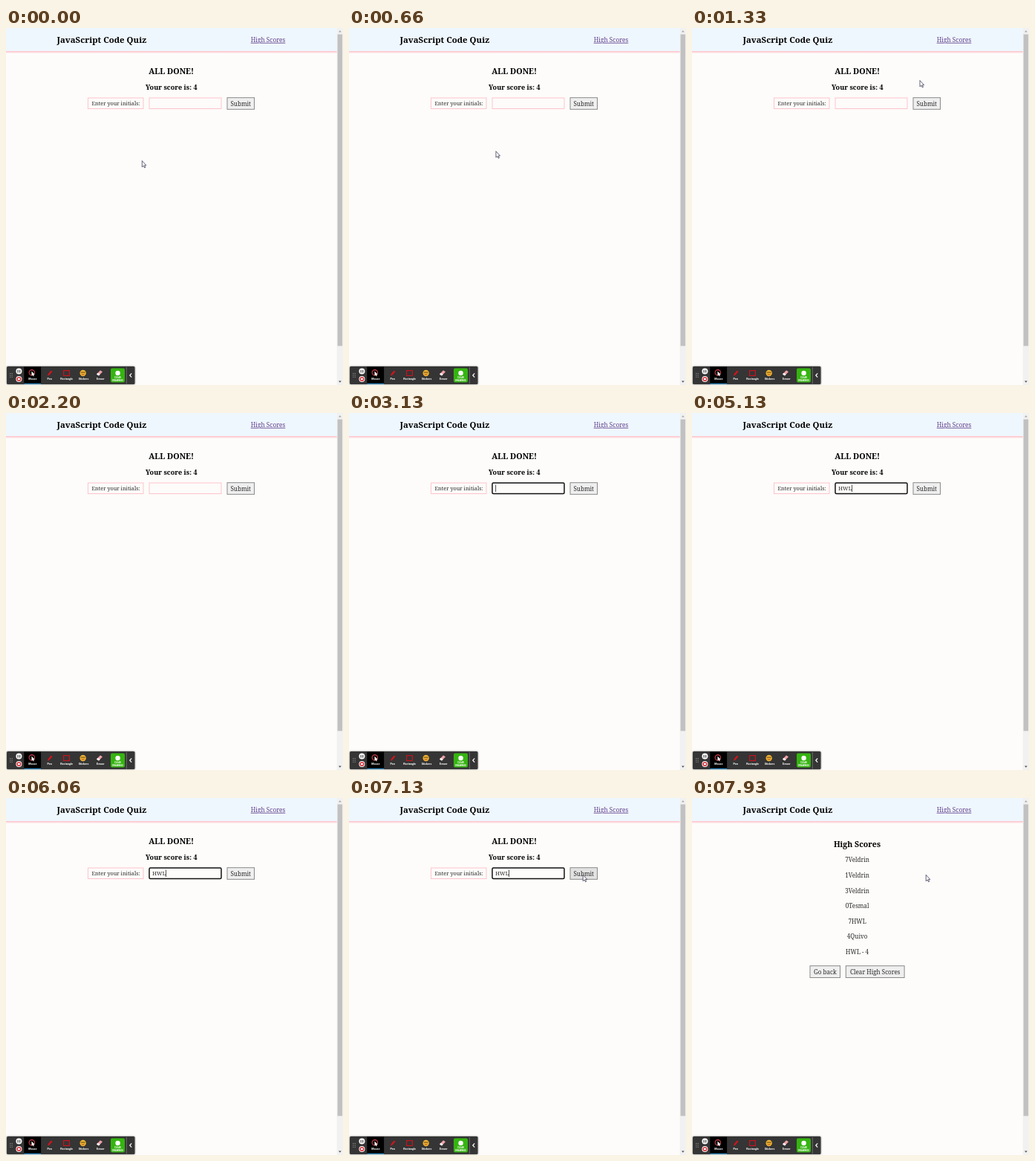
An HTML page that plays this animation: 454x480 px, repeating every 8000 ms.

```html
<!DOCTYPE html>
<html lang="en">
<head>
<meta charset="utf-8">
<title>Code Quiz</title>
<style>
  html, body { margin: 0; width: 100%; height: 100%; overflow: hidden; background: #fdfcfa; }
  svg { display: block; width: 100vw; height: 100vh; }
  text { font-family: "Noto Serif", serif; font-size: 8.05px; fill: #2b2b2b; }
  .mid { text-anchor: middle; }
  .head { font-weight: 700; fill: #000; }
  .link { font-size: 8.3px; fill: #63418c; text-decoration: underline; }
  .small { font-size: 7.25px; }
  .pink { fill: #fdfcfa; stroke: #ffc3cd; }
  .button { fill: #efefef; stroke: #8a8a8a; }
  .tool { font: 700 3.7px Roboto, sans-serif; fill: #fff; text-anchor: middle; }
  .tiny { font-size: 2.9px; }
</style>
</head>
<body>
<svg viewBox="0 0 454 480" preserveAspectRatio="none">
  <defs>
    <linearGradient id="glow" x2="0" y2="1">
      <stop offset="0" stop-color="#ffb6c1"/>
      <stop offset="1" stop-color="#ffb6c1" stop-opacity="0"/>
    </linearGradient>
    <filter id="shade" x="-5%" y="-30%" width="110%" height="160%">
      <feDropShadow dx="0" dy="0" stdDeviation="1.3" flood-opacity=".55"/>
    </filter>
  </defs>

  <rect width="454" height="480" fill="#fdfcfa"/>
  <rect y="30.5" width="446" height="4" fill="url(#glow)"/>
  <rect width="446" height="31" fill="#eff7fe"/>
  <text class="head" x="68.5" y="19.8" style="font-size:11.4px">JavaScript Code Quiz</text>
  <text class="link mid" x="353" y="18.8">High Scores</text>

  <g id="done">
    <text class="head mid" x="222.7" y="62" style="font-size:10.7px">ALL DONE!</text>
    <text class="head mid" x="222.7" y="83" style="font-size:9.15px">Your score is: 4</text>
    <rect class="pink" x="110.5" y="94" width="74.5" height="14.5"/>
    <text class="small mid" x="148" y="104">Enter your initials:</text>
    <rect id="field" class="pink" x="193" y="94" width="97" height="14.5"/>
    <text id="typed" class="small" x="197.3" y="104"></text>
    <rect id="caret" y="96.5" width=".8" height="9.5" fill="#222"/>
    <rect id="submit" class="button" x="298" y="93.7" width="36.5" height="15.6"/>
    <text class="mid" x="316.2" y="104.5">Submit</text>
  </g>

  <g id="scores">
    <text class="head mid" x="222.5" y="66" style="font-size:10.6px">High Scores</text>
    <g id="list"></g>
    <rect class="button" x="159" y="225.7" width="40.5" height="15.8"/>
    <text class="mid" x="179.3" y="236.5">Go back</text>
    <rect class="button" x="207.3" y="225.7" width="78.8" height="15.8"/>
    <text class="mid" x="246.8" y="236.5">Clear High Scores</text>
  </g>

  <!-- scrollbar -->
  <rect x="445.7" width="8.3" height="480" fill="#f1f1f1"/>
  <rect x="446.6" y="8.5" width="6.5" height="419" fill="#c1c1c1"/>
  <path d="M448 5.6l1.9-2.4 1.9 2.4z" fill="#a3a3a3"/>
  <path d="M448 474.4l1.9 2.4 1.9-2.4z" fill="#505050"/>

  <!-- drawing toolbar -->
  <rect x="1" y="455" width="172.5" height="24" rx="1.5" fill="#343434" filter="url(#shade)"/>
  <path d="M5.8 464v6.5M8.2 464v6.5" stroke="#aaa" stroke-width="1" stroke-dasharray="1 1.4"/>
  <circle cx="17.4" cy="461.6" r="4" fill="#fff"/>
  <path d="M16.1 459.7v3.8M18.7 459.7v3.8" stroke="#333" stroke-width="1.1"/>
  <circle cx="17.4" cy="472" r="4" fill="#fff"/>
  <circle cx="17.4" cy="472" r="3.1" fill="#d9343c"/>
  <rect x="16.1" y="470.7" width="2.6" height="2.6" fill="#fff"/>
  <rect x="24.3" y="455.5" width="22.8" height="23.3" fill="#000"/>
  <rect x="24.3" y="477.7" width="22.8" height="1.3" fill="#2b83b8"/>
  <circle cx="34.8" cy="463.3" r="3.7" fill="none" stroke="#d5404a" stroke-width="1.1"/>
  <path d="M34.5 461.6v6l1.4-1.2 1 1.9 1-.5-.9-1.8h1.8z" fill="#fff"/>
  <path d="M56 467.8l1-3 3.8-4.4 1.7 1.4-3.8 4.5z" fill="#d4141e"/>
  <rect x="77.6" y="460.6" width="7.8" height="6.8" fill="none" stroke="#c4141e" stroke-width="1.2"/>
  <circle cx="103.7" cy="464" r="4.2" fill="#f2b632"/>
  <path d="M100.7 463h6" stroke="#5a3a14" stroke-width="1"/>
  <path d="M101.7 465.3q2 2 4 0" fill="none" stroke="#a33a20" stroke-width=".9"/>
  <path d="M122 465.4l5-5.2 3 2-5 5.2z" fill="#f0a3aa"/>
  <path d="M122 465.4l1.6-1.7 3 2-1.6 1.7z" fill="#fff"/>
  <rect x="141" y="457.5" width="19" height="19" rx="2" fill="#35b410"/>
  <circle cx="150.6" cy="464" r="3.2" fill="#fff"/>
  <text class="tool tiny" x="150.5" y="471.4">CLEAR</text>
  <text class="tool tiny" x="150.5" y="474.6">DRAWINGS</text>
  <path d="M162.3 456v22.5" stroke="#777" stroke-width=".8"/>
  <path d="M169.2 464.3l-2.4 2.7 2.4 2.7" fill="none" stroke="#fff" stroke-width="1.2"/>
  <g id="tools"></g>

  <path id="pointer" d="M0 0v8.4l2-1.7 1.3 2.8 1.2-.6-1.2-2.7h2.3z" fill="#fff" stroke="#34344f" stroke-width=".75" stroke-linejoin="round"/>
</svg>
<script>
const LOOP = 8000, FOCUS = 2800, SUBMIT = 7500, BLINK = 530;
const initials = "HWL";
const keyTimes = [3750, 4100, 4700];
// time, x, y of the pointer tip
const path = [
  [0, 183.3, 178.5], [500, 183.3, 178.5], [1250, 307, 70.5], [1600, 307, 70.5],
  [2400, 240, 101], [6300, 240, 101], [6950, 315.2, 103.3], [LOOP, 315.2, 103.3]
];
const $ = id => document.getElementById(id);

function addText(parent, className, x, y, content) {
  const node = document.createElementNS("http://www.w3.org/2000/svg", "text");
  node.setAttribute("class", className);
  node.setAttribute("x", x);
  node.setAttribute("y", y);
  node.textContent = content;
  parent.append(node);
}

["7Veldrin", "1Veldrin", "3Veldrin", "0Tesmal", "7" + initials, "4Quivo", initials + " - 4"]
  .forEach((row, i) => addText($("list"), "mid", 222.6, 86.2 + i * 20.65, row));
["Mouse", "Pen", "Rectangle", "Stickers", "Eraser"]
  .forEach((name, i) => addText($("tools"), "tool", 35.8 + i * 22.9, 473.2, name));

function pointerAt(time) {
  const next = Math.max(1, path.findIndex(step => step[0] > time));
  const [t0, x0, y0] = path[next - 1], [t1, x1, y1] = path[next];
  const p = (time - t0) / (t1 - t0), ease = p * p * (3 - 2 * p);
  return [x0 + (x1 - x0) * ease, y0 + (y1 - y0) * ease];
}

const show = (id, on) => $(id).style.display = on ? "" : "none";

function render(time) {
  const submitted = time >= SUBMIT, focused = time >= FOCUS;
  show("done", !submitted);
  show("scores", submitted);

  const count = keyTimes.filter(t => t <= time).length;
  $("typed").textContent = initials.slice(0, count);
  const lastKey = count ? keyTimes[count - 1] : FOCUS;
  show("caret", focused && (time - lastKey) % (2 * BLINK) < BLINK);
  if (!submitted) $("caret").setAttribute("x", 197.3 + (count ? $("typed").getComputedTextLength() : 0));

  const field = $("field");
  field.style.stroke = focused ? "#101010" : "";
  field.style.strokeWidth = focused ? 1.5 : 1;
  field.setAttribute("rx", focused ? 1.5 : 0);

  const [x, y] = pointerAt(time);
  const inside = (left, right) => x > left && x < right && y > 93 && y < 109;
  $("submit").style.fill = inside(298, 335) ? "#e2e2e2" : "";
  $("pointer").setAttribute("transform", `translate(${x} ${y})`);
  show("pointer", !inside(193, 290));
}

const start = performance.now();
function tick() {
  render((performance.now() - start) % LOOP);
  requestAnimationFrame(tick);
}
tick();
</script>
</body>
</html>
```
